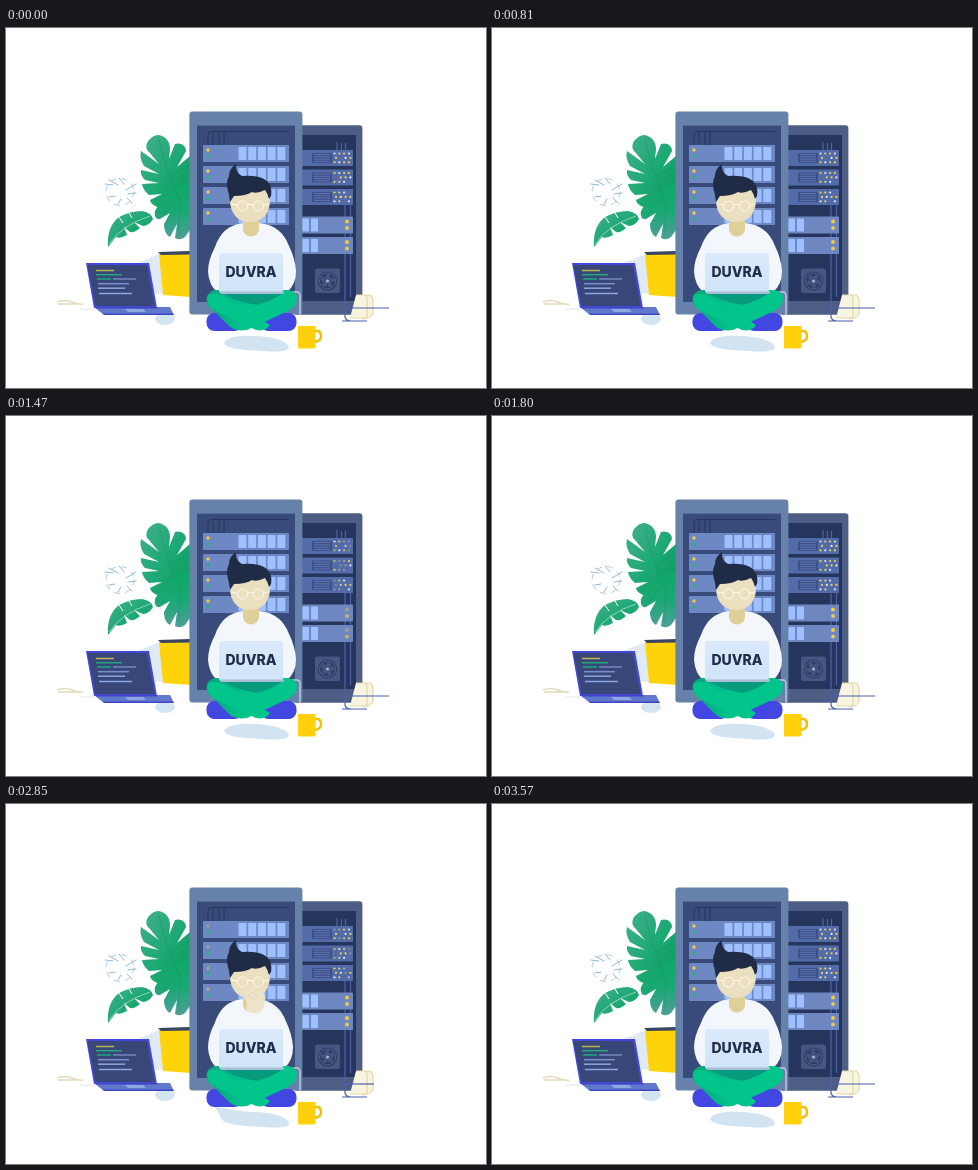
Animation, 480 px wide and 360 px high, one loop 3600 ms. Source, as an HTML page:

```html
<!DOCTYPE html>
<html lang="en">
<head>
<meta charset="utf-8">
<title>Server room developer</title>
<style>
html, body { margin: 0; width: 100%; height: 100%; overflow: hidden; background: #fff; }
svg { display: block; width: 480px; height: 360px; }
.led { animation: blink 1200ms ease-in-out infinite; }
.fan { transform-origin: 321.5px 253px; animation: spin 1200ms linear infinite; }
.hand { animation: think 3600ms ease-in-out infinite; }
.shade { animation: pool 3600ms ease-in-out infinite; }
.lead { stroke-dasharray: 46; animation: lead 3600ms ease-in-out infinite; }
.shirt { transform-origin: 202px 260px; animation: lean 3600ms ease-in-out infinite; }
@keyframes blink { 0%, 28%, 50%, 100% { opacity: 1 } 38% { opacity: .35 } }
@keyframes spin { to { transform: rotate(360deg) } }
@keyframes think { 0%, 67%, 97%, 100% { transform: translate(2px, 43px) } 77%, 88% { transform: none } }
@keyframes lean { 0%, 65%, 97%, 100% { transform: none } 77%, 88% { transform: scaleX(.966) } }
@keyframes lead { 0%, 67%, 97%, 100% { stroke-dashoffset: 0 } 77%, 88% { stroke-dashoffset: 16 } }
@keyframes pool {
  0%, 52%, 97%, 100% { d: path("M218 315C221 309 233 307 247 308C265 308 282 313 283 319C282 324 271 324 257 323C236 322 221 321 218 315Z") }
  77%, 88% { d: path("M209 303C217 303 225 307 247 308C265 308 282 313 283 319C284 324 271 324 257 323C232 322 215 320 214 312Z") }
}
</style>
</head>
<body>
<svg viewBox="0 0 480 360">
  <defs>
    <linearGradient id="leaf" x1="0" y1="0" x2="1" y2="1">
      <stop stop-color="#43b08c"/><stop offset=".55" stop-color="#1ba873"/><stop offset="1" stop-color="#0b9a5b"/>
    </linearGradient>
    <linearGradient id="low" x1="0" y1="0" x2="0" y2="1">
      <stop stop-color="#10a868"/><stop offset=".5" stop-color="#1aa873"/><stop offset="1" stop-color="#4f9f9a"/>
    </linearGradient>
    <linearGradient id="leg" x1="0" y1="0" x2="1" y2="0">
      <stop stop-color="#08a57f"/><stop offset=".45" stop-color="#02c58c"/><stop offset="1" stop-color="#02c58c"/>
    </linearGradient>
    <linearGradient id="lid" x1="0" y1="0" x2="0" y2="1">
      <stop stop-color="#dbe9fc"/><stop offset="1" stop-color="#cfe4f7"/>
    </linearGradient>
  </defs>

  <!-- plant -->
  <g fill="none" stroke="#8db9df" stroke-linecap="round">
    <ellipse cx="114" cy="164" rx="14" ry="13.5" stroke="#a9cbea" stroke-dasharray="5 6"/>
    <path d="M99 156L107 157M103 152L112 157M113 150L118 156M120 162L130 156M122 166L130 165M103 169L109 168M112 176L115 171M121 170L126 175"/>
  </g>
  <path fill="url(#leaf)" d="M152 107C160 108 164 114 164 121L163 131L169 116C175 114 180 118 180 123L171 139L184 128V180H162C152 181 145 177 144 172L156 166L143 167Q137 162 136 156L153 155L139 152Q134 147 135 142L153 146L138 138Q133 130 135 123L153 136L143 124Q138 120 142 113Q147 107 152 107Z"/>
  <path fill="url(#low)" d="M184 156C168 157 158 168 149 183C148 188 150 192 154 191L164 185L158 196C158 202 160 207 164 209L171 196L169 210Q174 213 179 209L184 202Z"/>
  <path fill="none" stroke="#0a8657" stroke-opacity=".5" stroke-width=".6" d="M153 111Q159 141 172 168M171 168Q163 176 156 188M174 168L173 207M163 148L184 138"/>
  <path fill="url(#leaf)" d="M102 219C101 205 105 195 113 189Q124 183 136 183Q146 185 147 191Q143 198 137 198L128 194L134 200Q129 205 124 204L118 199L121 207Q114 211 110 209Z"/>
  <path fill="none" stroke="#fff" d="M113 189L117 195M123 185L126 190"/>
  <path fill="none" stroke="#d8f0e7" stroke-width=".6" d="M103 216Q116 197 144 188"/>
  <path fill="#dfeaf5" d="M131 235L154 226L157 266L146 265Z"/>
  <path fill="#ffd30a" d="M153 226H185V269L157 267Z"/>
  <path fill="#394564" d="M152 224L184 223V226.5L155 227Z"/>

  <!-- floor marks -->
  <g fill="none" stroke="#e2dabb" stroke-width="1.5">
    <path d="M51 274Q59 271 66 274T77 276M52 276H70"/>
    <path stroke="#e9eff6" d="M74 281H88"/>
  </g>
  <ellipse cx="159" cy="291" rx="10" ry="6" fill="#d4e5f2"/>

  <!-- side laptop -->
  <path fill="#4348d9" d="M80 235H143L151 280H88Z"/>
  <path fill="#384777" d="M81.5 237H141L148.5 278H89.5Z"/>
  <path fill="#6278cc" d="M88 279H164L168 287H98Z"/>
  <path fill="#3f46c6" d="M88 279H151L152 280.5H90ZM97 285.5H167L168 287H98Z"/>
  <path fill="#8fa8e4" d="M119 281H137L140 284H122Z"/>
  <g id="code" fill="none" stroke-width="1.5"></g>

  <!-- back cabinet -->
  <rect x="288" y="97.3" width="68.4" height="189.4" rx="3" fill="#4d5d83"/>
  <rect x="292" y="107" width="58" height="166" fill="#26355b"/>
  <rect x="309" y="240.5" width="25" height="24.5" rx="2" fill="#455683"/>
  <circle cx="321.5" cy="253" r="9.5" fill="#2a395f"/>
  <circle cx="321.5" cy="253" r="8" fill="none" stroke="#5d70a0" stroke-width=".8"/>
  <g class="fan" id="fan" fill="#43547f"></g>
  <circle cx="321.5" cy="253" r="1.6" fill="#a3b3d6"/>

  <!-- cables -->
  <g fill="none" stroke="#4d60ad" stroke-width="1.2">
    <path fill="#f7f4e2" stroke="#e1d7a5" d="M350 267H358Q361 267 361 272V290H344M357 267H364Q367 269 367 274V285Q366 290 357 291"/>
    <path d="M331 122V114M335.5 122V115M339.5 122V115"/>
    <path d="M339 177V289Q340 293 345 293H361M344.5 177V269M336 293H348"/>
    <path class="lead" d="M338 280H383"/>
  </g>
  <g id="back"></g>

  <!-- front cabinet -->
  <rect x="183.4" y="83.4" width="113" height="203.2" rx="3" fill="#6782aa"/>
  <rect x="191" y="97.6" width="98" height="176.4" fill="#394b7b"/>
  <path fill="none" stroke="#25345a" d="M202 117V107Q202 103.5 205 103.5H283M207 117V104M213 117V104M218 117V104"/>
  <g id="front"></g>

  <path class="shade" fill="#d2e4f1" d="M218 315C221 309 233 307 247 308C265 308 282 313 283 319C282 324 271 324 257 323C236 322 221 321 218 315Z"/>

  <!-- person -->
  <path fill="none" stroke="#c3cad8" stroke-width="1.4" d="M286 264H291Q294 264 294 268V287"/>
  <path class="shirt" fill="#f3f6fb" d="M237 195C222 197 214 205 209 219Q202 232 202 244Q203 257 211 264H281Q290 257 290 243Q289 230 283 218C278 205 270 197 253 195Z"/>
  <path fill="#dfcf98" d="M237 188H253V202Q251 208.5 245 208.5Q239 208.5 237 202Z"/>
  <path fill="#eadfbf" d="M224 160H264V172C264 186 256 194 244 194C232 194 224 186 224 172Z"/>
  <path fill="#202c46" d="M223 167Q219 155 223 148Q223 141 230 136Q229 144 236 148Q250 147 258 151Q267 156 265 168L263 171Q262 166 259 162Q251 166 246 164Q240 168 228 168L224 174Z"/>
  <g fill="none" stroke="#fff" stroke-opacity=".8">
    <circle cx="236.5" cy="178" r="5"/><circle cx="252.5" cy="178" r="5"/>
    <path d="M241.5 177Q244.5 175.5 247.5 177M225 176L231.5 177M257.5 177L263 176"/>
  </g>
  <g class="hand">
    <path fill="#f3f6fb" d="M240 207L259 204L264 238H244Z"/>
    <path fill="#ece3c8" d="M237 190Q238 186 243 188L245 184Q248 181 249 188Q255 185 258 190Q261 198 255 208Q247 211 240 207L241 199Z"/>
    <path fill="none" stroke="#dccfa6" stroke-width=".7" d="M242 191L248 195M246 188L252 193"/>
  </g>
  <g fill="#4147e0">
    <rect x="200.5" y="285" width="36" height="18" rx="8"/>
    <rect x="254.5" y="285" width="36" height="18" rx="8"/>
  </g>
  <path fill="url(#leg)" d="M211 262H280Q290 262 291 270Q291 278 282 283L241 302Q228 304 222 297L206 281Q199 276 201 268Q204 262 211 262Z"/>
  <path fill="#079b7d" d="M216 265H277Q266 273 251 277Q230 274 216 265Z"/>
  <path fill="#02c58c" d="M202 267Q211 264 220 270L264 297Q260 304 250 302L207 282Q199 276 202 267Z"/>
  <rect x="213" y="225" width="64" height="40" rx="3" fill="url(#lid)"/>
  <path fill="#a9bdd4" d="M214 263.5H278Q279 266 275 266H217Q213 266 214 263.5Z"/>
  <text x="245" y="249" text-anchor="middle" font-family="Inter, Arial, sans-serif" font-weight="800" font-size="14" fill="#202c4b">DUVRA</text>

  <!-- mug -->
  <path fill="none" stroke="#f2bd08" stroke-width="2.4" d="M309 303H312Q315 304 315 308Q315 313 309 314"/>
  <path fill="#ffd00b" d="M292 298H309.5V319Q309 320.5 307 320.5H294Q292 320.5 292 319Z"/>
</svg>
<script>
const fill = (id, html) => document.getElementById(id).innerHTML = html;
const times = (n, fn) => Array.from({ length: n }, (_, i) => fn(i)).join('');
const rect = (x, y, w, h, c) => `<rect x="${x}" y="${y}" width="${w}" height="${h}" rx=".8" fill="${c}"/>`;
const led = (x, y, c, delay, r = 1.7) =>
  `<circle class="led" cx="${x}" cy="${y}" r="${r}" fill="${c}" style="animation-delay:${-delay}ms"/>`;
const line = (x, y, w, c) => `<path d="M${x} ${y}h${w}" stroke="${c}"/>`;

fill('code', [
  [90, 242.5, 18, '#b8b54d'], [90, 246.7, 26, '#20aa7c'], [91, 251, 14, '#20aa7c'],
  [107, 251, 23, '#7187bd'], [92, 255.7, 31, '#7890d0'], [92, 260.2, 27, '#8da6e4'], [93, 265.4, 33, '#8da6e4']
].map(a => line(...a)).join(''));

fill('front', times(4, i => {
  const y = 117 + i * 21;
  return rect(197, y, 86, 17, '#6e88c3')
    + times(5, j => rect(232.5 + j * 9.7, y + 2, 8, 13, '#9fc0ff'))
    + led(202, y + 5, '#f3cb3d', i * 20) + led(202, y + 11, '#25b37c', 300 + i * 20);
}));

// status lights sit on a staggered grid with gaps
const lights = (y, i) => times(12, j => {
  const row = Math.floor(j / 4);
  if ((j + i) % 7 === 5) return '';
  return led(328.5 + j % 4 * 4.8 + row % 2 * 1.5, y + 3.5 + row * 4.4,
    (j * 5 + i) % 3 ? '#ecd257' : '#dce7fa', (j * 70 + i * 110) % 300, 1.1);
});

fill('back', times(3, i => {
  const y = 122 + i * 19.5;
  return rect(295, y, 52, 16, '#536ba8')
    + rect(306, y + 3, 20, 10, '#3d5088')
    + times(4, j => line(308, y + 4.5 + j * 2.3, 16, '#5f76b2'))
    + lights(y, i);
}) + times(2, i => {
  const y = 188.5 + i * 20.5;
  return rect(293, y, 54, 17, '#6e87c0')
    + rect(296, y + 2, 7, 13, '#9fc0ff') + rect(305, y + 2, 7, 13, '#9fc0ff')
    + led(341, y + 5, '#f3cb3d', 200, 2) + led(341, y + 11.5, '#e3cb55', 260, 2);
}));

fill('fan', times(5, i =>
  `<path d="M321.5 253C318 249 319 246 323 246Q326 248 321.5 253Z" transform="rotate(${i * 72} 321.5 253)"/>`));
</script>
</body>
</html>
```
